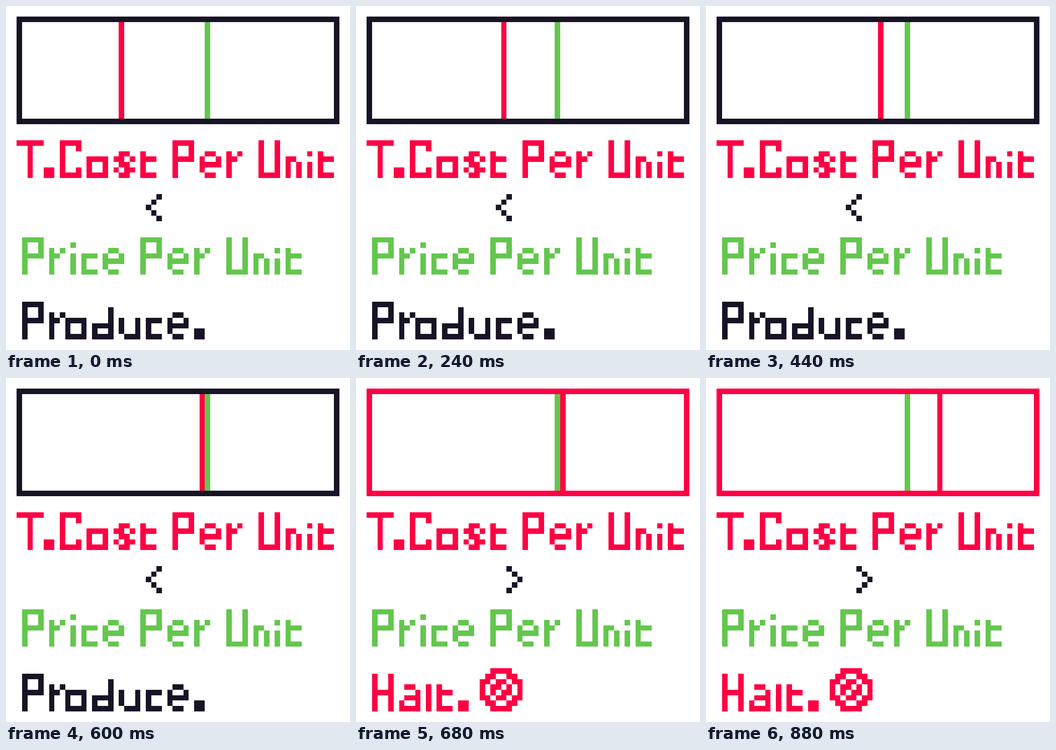
An HTML page with a canvas that plays this animation: 748x748 px, repeating every 0.92 s.

```html
<!DOCTYPE html>
<html lang="en">
<head>
<meta charset="utf-8">
<title>Cost versus price</title>
<style>
  html, body { margin: 0; width: 100%; height: 100%; overflow: hidden; background: #fff; }
  canvas { display: block; }
</style>
</head>
<body>
<canvas id="stage" width="748" height="748"></canvas>
<script>
const ctx = document.getElementById('stage').getContext('2d');
const CELL = 748 / 64, STEP = 40, STEPS = 23;
const DARK = '#181425', RED = '#ff0044', GREEN = '#63c74d';
const START_COL = 21, PRICE_COL = 37;

// Glyph rows from top to bottom; every glyph stands on the baseline.
const GLYPHS = {
  T: '##### ..#.. ..#.. ..#.. ..#.. ..#.. ..#..',
  C: '#### #..# #... #... #... #..# ####',
  P: '#### #..# #..# #### #... #... #...',
  U: '#..# #..# #..# #..# #..# #..# ####',
  H: '#..# #..# #..# #### #..# #..# #..#',
  a: '.##. ...# .### #..# ####',
  c: '### #.. #.. ###',
  d: '...# ...# ...# #### #..# ####',
  e: '.##. #..# #### #... .##.',
  i: '# . # # #',
  I: '# . # # # #',  // taller i
  l: '# # # # #',
  n: '##. #.# #.# #.#',
  o: '#### #..# #..# ####',
  r: '#.# ##. #.. #.. #..',
  s: '.##. ##.# .##. #.## .##.',
  t: '#.. ### #.. #.. ###',
  u: '#..# #..# #..# .###',
  '.': '## ##',
  '<': '..# .#. #.. .#. ..#',
  '>': '#.. .#. ..# .#. #..',
  '@': '..####.. .##..##. ##.##.## #.##.#.# #.#.##.# ##.##.## .##..##. ..####..'  // stop sign
};

function box(x, y, w, h, color) {
  const left = Math.round(x * CELL), top = Math.round(y * CELL);
  ctx.fillStyle = color;
  ctx.fillRect(left, top, Math.round((x + w) * CELL) - left, Math.round((y + h) * CELL) - top);
}

// A space is two cells wide, and "|" pulls the next glyph one cell closer.
function write(text, x, baseline, color) {
  for (const char of text) {
    if (char === ' ') { x += 2; continue; }
    if (char === '|') { x -= 1; continue; }
    const rows = GLYPHS[char].split(' ');
    rows.forEach((row, r) => [...row].forEach((dot, c) => {
      if (dot === '#') box(x + c, baseline - rows.length + r, 1, 1, color);
    }));
    x += rows[0].length + 1;
  }
}

function draw(time) {
  const costCol = START_COL + Math.floor(time / STEP) % STEPS;
  const halted = costCol >= PRICE_COL;

  box(0, 0, 64, 64, '#fff');
  box(2, 2, 60, 20, halted ? RED : DARK);
  box(3, 3, 58, 18, '#fff');
  box(PRICE_COL, 3, 1, 18, GREEN);
  box(costCol, 3, 1, 18, RED);

  write('T|.Cost Per Unit', 2, 32, RED);
  write(halted ? '>' : '<', halted ? 28 : 26, 40, DARK);
  write('PrIce Per Unit', 3, 50, GREEN);
  if (halted) {
    write('Halt.', 3, 62, RED);
    write('@', 23, 62, RED);
  } else {
    write('Pr|oduce.', 3, 62, DARK);
  }
}

const start = performance.now();
function tick() {
  draw(performance.now() - start);
  requestAnimationFrame(tick);
}
tick();
</script>
</body>
</html>
```
